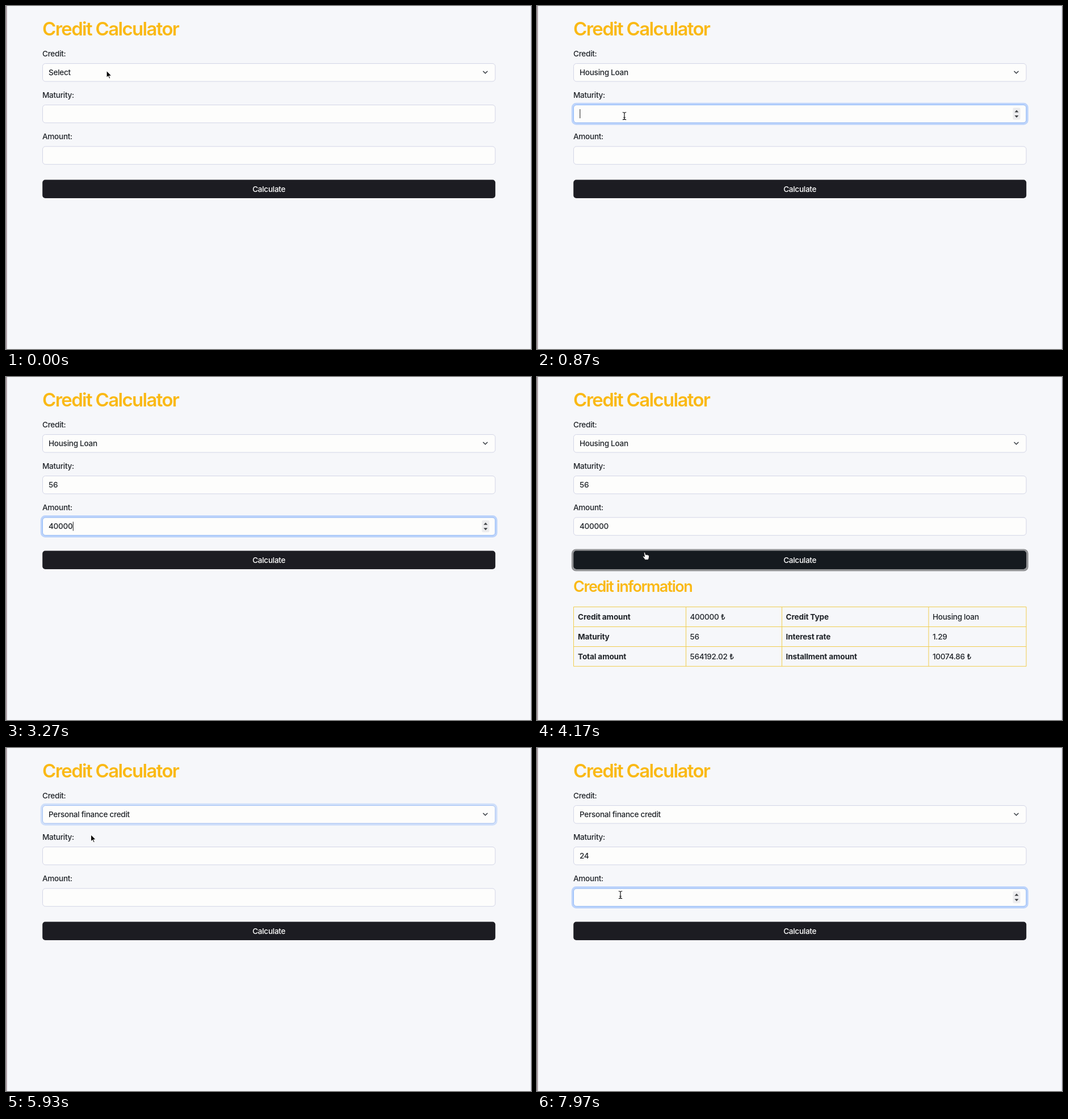
An HTML page that plays this animation: 925 by 605 pixels, repeating every 8 s.

```html
<!DOCTYPE html>
<html lang="en">
<head>
<meta charset="utf-8">
<title>Credit Calculator</title>
<style>
  html, body { margin: 0; width: 100%; height: 100%; overflow: hidden; background: #f6f7fa; }
  svg { display: block; width: 100%; height: 100%; }
  text {
    font: 450 13.6px Inter, "Open Sans", sans-serif;
    font-optical-sizing: none;
    letter-spacing: -.022em;
    fill: #1f2328;
    white-space: pre;
  }
  .title, .subtitle { font-weight: 600; fill: #fab915; }
  .title { font-size: 33px; letter-spacing: -.051em; }
  .subtitle { font-size: 27px; letter-spacing: -.056em; }
  .bold { font-weight: 700; letter-spacing: -.01em; }
  .field { fill: #fdfdfc; stroke: #d3d5e6; }
  .ring { fill: none; stroke: #bdd4fb; stroke-width: 3.4; }
  .ring-edge { fill: none; stroke: #8db9fb; }
  .grid { fill: none; stroke: #f0cd50; }
  #menu { filter: drop-shadow(0 4px 7px rgba(0, 0, 0, .25)); }
</style>
</head>
<body>
<svg id="stage" viewBox="0 0 925 605">
  <rect width="925" height="605" fill="#f6f7fa"/>
  <rect width="1.6" height="605" fill="#a3949c"/>
  <rect x="924" width="1" height="605" fill="#dcdcf0"/>
  <text class="title" x="64" y="52">Credit Calculator</text>
  <g id="form"></g>
  <g id="button">
    <rect id="buttonRing" x="62.5" y="305.3" width="801.5" height="35.4" rx="6" fill="none" stroke="#929395" stroke-width="3.4"/>
    <rect id="buttonFace" x="64.2" y="306.6" width="798" height="32.4" rx="5"/>
    <text x="463.2" y="328" text-anchor="middle" style="fill:#fff">Calculate</text>
  </g>
  <g id="result">
    <text class="subtitle" x="64" y="378.5">Credit information</text>
    <path class="grid" d="M64.5 405.5H862V510.3H64.5ZM64.5 440.5H862M64.5 475.5H862M262.5 405.5V510M431.5 405.5V510M690 405.5V510"/>
  </g>
  <g id="menu">
    <rect x="55.5" y="104.5" width="799" height="82.5" rx="5" fill="#ebebec" stroke="#bfbfca"/>
    <rect id="highlight" x="56" width="798" height="18.75" fill="#3a87f2"/>
    <path id="check" d="M61.5 117.5l2.6 3.3 4.6-8" fill="none" stroke-width="1.4"/>
  </g>
  <g id="pointer">
    <path id="arrow" transform="translate(-.4 0) scale(1.08)" d="M0 0V11.6L2.7 9.2 4.4 13.2 6.3 12.4 4.6 8.5H8.2Z" fill="#000" stroke="#fff" stroke-width="1"/>
    <g id="beam" fill="none">
      <path d="M-3.2-6.5Q0-6.5 0-4.8V4.8Q0 6.5-3.2 6.5M3.2-6.5Q0-6.5 0-4.8V4.8Q0 6.5 3.2 6.5M-1.8 2.5H1.8" stroke="#fff" stroke-width="2.4"/>
      <path d="M-3.2-6.5Q0-6.5 0-4.8V4.8Q0 6.5-3.2 6.5M3.2-6.5Q0-6.5 0-4.8V4.8Q0 6.5 3.2 6.5M-1.8 2.5H1.8" stroke="#111" stroke-width="1.2"/>
    </g>
    <path id="hand" transform="translate(-.6 -.8) scale(1.08)" d="M-1 .8Q0-.6 1 .8L2 4.2Q3 3.3 4 4.2 5 3.6 5.8 4.7 7.3 4.3 7.5 6L7.2 9.5 6 12.2H1L-2.6 7.4Q-2.8 6-1.3 6.2L.2 7.4Z" fill="#fff" stroke="#111" stroke-width=".8"/>
  </g>
</svg>
<script>
const LOOP = 8000;
const $ = id => document.getElementById(id);

function add(parent, tag, attrs, content = "") {
  const node = document.createElementNS("http://www.w3.org/2000/svg", tag);
  for (const key in attrs) node.setAttribute(key, attrs[key]);
  node.textContent = content;
  return parent.appendChild(node);
}
const show = (node, on) => node.style.display = on ? "" : "none";

function makeField(label, top) {
  const form = $("form");
  add(form, "text", { x: 64, y: top - 12 }, label);
  add(form, "rect", { class: "field", x: 64.5, y: top + .5, width: 797.5, height: 31.5, rx: 5 });
  const ring = add(form, "g", {});
  add(ring, "rect", { class: "ring", x: 62.5, y: top - 1.5, width: 801.5, height: 35.5, rx: 6.5 });
  add(ring, "rect", { class: "ring-edge", x: 64.5, y: top + .5, width: 797.5, height: 31.5, rx: 5 });
  const value = add(form, "text", { x: 75, y: top + 21 });
  return { top, ring, value };
}

function makeNumberField(label, top) {
  const field = makeField(label, top);
  field.spinner = add($("form"), "g", {});
  add(field.spinner, "rect", { x: 838.5, y: top + 5.5, width: 13, height: 21, rx: 2, fill: "#ececee" });
  add(field.spinner, "path", { d: `M841.5 ${top + 13.5}l3.5-4 3.5 4zM841.5 ${top + 19}l3.5 4 3.5-4z`, fill: "#3f4245" });
  field.caret = add($("form"), "rect", { y: top + 8, width: 1, height: 16, fill: "#222" });
  return field;
}

const credit = makeField("Credit:", 101);
add($("form"), "path", { d: "M841 115.2l3.5 3.5 3.5-3.5", fill: "none", stroke: "#343a40", "stroke-width": 1.5, "stroke-linecap": "round", "stroke-linejoin": "round" });
const maturity = makeNumberField("Maturity:", 174);
const amount = makeNumberField("Amount:", 247.3);

[
  ["Credit amount", "400000 ₺", "Credit Type", "Housing loan"],
  ["Maturity", "56", "Interest rate", "1.29"],
  ["Total amount", "564192.02 ₺", "Installment amount", "10074.86 ₺"]
].forEach((cells, row) => cells.forEach((cell, col) =>
  add($("result"), "text", { x: [72, 269.5, 438.5, 697][col], y: 428 + 35 * row, class: col % 2 ? "" : "bold" }, cell)));

const ROW = 18.75;
const options = ["Select", "Housing Loan", "Personal finance credit", "Auto loan"].map((name, i) =>
  add($("menu"), "text", { x: 73.5, y: 121.3 + ROW * i }, name));

// [time, x, y]
const path = [
  [0, 177.5, 114], [180, 177.5, 114], [370, 165, 137], [450, 165, 137], [680, 154, 194],
  [1800, 154, 194], [2200, 158, 262], [3450, 158, 262], [3900, 190, 310], [4400, 190, 310],
  [4900, 90, -20], [5050, 90, -20], [5390, 152, 108.5], [5540, 152, 108.5], [5770, 150, 152],
  [5900, 150, 152], [6250, 148, 177], [7150, 148, 177], [7420, 147, 259], [8000, 147, 259]
];
const menus = [[110, 430], [5430, 5830]];
const typingPauses = [[1350, 1800], [2650, 3450], [6800, 7150]];
const focus = {
  credit: [[430, 700], [5830, 6250]],
  maturity: [[700, 2230], [6250, 7450]],
  amount: [[2230, 3980], [7450, 8200]],
  button: [[3980, 5000]]
};
const keys = {
  maturity: [[[1350, 1550], "56"], [[6800, 6980], "24"]],
  amount: [[[2650, 2800, 2920, 3040, 3160, 3330], "400000"]]
};
const RELOAD = 5000;

const within = (t, spans) => spans.some(([from, to]) => t >= from && t < to);
const clamp = v => Math.max(0, Math.min(1, v));

function pointerAt(t) {
  const i = Math.max(1, path.findIndex(p => p[0] >= t));
  const [t0, x0, y0] = path[i - 1], [t1, x1, y1] = path[i];
  const u = clamp((t - t0) / (t1 - t0)), k = u * u * (3 - 2 * u);
  return [x0 + (x1 - x0) * k, y0 + (y1 - y0) * k];
}

function ringOpacity(t, spans) {
  return Math.max(...spans.map(([from, to]) => {
    const fadeOut = to === RELOAD ? +(t < to) : clamp((to + 150 - t) / 150);
    return Math.min(clamp((t - from) / 150), fadeOut);
  }));
}

function drawNumber(field, name, t, hovered) {
  let text = "", last = 0;
  for (const [times, digits] of keys[name]) {
    if ((times[0] < RELOAD) !== (t < RELOAD)) continue;
    const typed = times.filter(k => t >= k);
    text = digits.slice(0, typed.length);
    last = typed.at(-1) || 0;
  }
  field.value.textContent = text;
  field.ring.style.opacity = ringOpacity(t, focus[name]);
  const span = focus[name].find(([from, to]) => t >= from && t < to);
  show(field.spinner, span || hovered);
  const lit = span && Math.floor((t - Math.max(last, span[0])) / 500) % 2 === 0;
  show(field.caret, lit);
  if (lit) field.caret.setAttribute("x", 75.3 + (text ? field.value.getComputedTextLength() : 0));
}

function draw(t) {
  const [x, y] = pointerAt(t);
  const menuOpen = within(t, menus);
  const over = top => !menuOpen && x > 64 && x < 862 && y >= top && y <= top + 32.5;
  const overMaturity = over(maturity.top), overAmount = over(amount.top), overButton = over(307);

  credit.value.textContent = t < 430 || (t >= RELOAD && t < 5830) ? "Select"
    : t < RELOAD ? "Housing Loan" : "Personal finance credit";
  credit.ring.style.opacity = ringOpacity(t, focus.credit);
  drawNumber(maturity, "maturity", t, overMaturity);
  drawNumber(amount, "amount", t, overAmount);

  const pressed = ringOpacity(t, focus.button);
  $("buttonRing").style.opacity = pressed;
  $("buttonFace").setAttribute("fill", overButton || pressed ? "#151a1f" : "#1c1c22");
  show($("result"), t >= 4000 && t < RELOAD);

  show($("menu"), menuOpen);
  const active = Math.max(0, Math.min(3, Math.floor((y - 108) / ROW)));
  $("highlight").setAttribute("y", 108 + ROW * active);
  $("check").setAttribute("stroke", active ? "#333" : "#fff");
  options.forEach((option, i) => option.style.fill = i === active ? "#fff" : "#333");

  const overText = overMaturity || overAmount;
  show($("pointer"), !within(t, typingPauses));
  $("pointer").setAttribute("transform", `translate(${x} ${y})`);
  show($("beam"), overText);
  show($("hand"), overButton);
  show($("arrow"), !overText && !overButton);
}

const start = performance.now();
function tick() {
  draw((performance.now() - start) % LOOP);
  requestAnimationFrame(tick);
}
tick();
</script>
</body>
</html>
```
